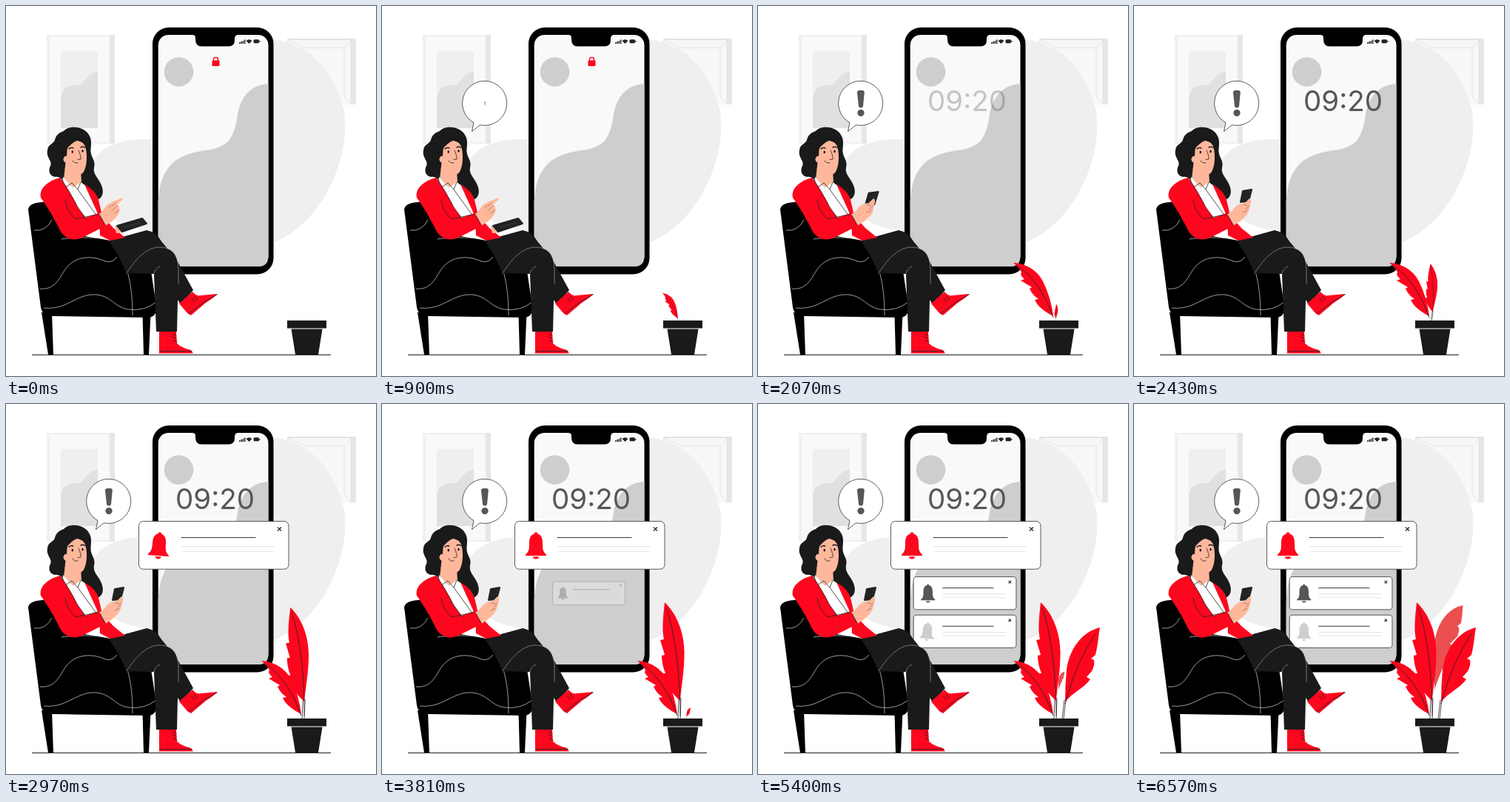
An HTML page that plays this animation: 500 px wide and 500 px high, repeating every 6.96 s.

```html
<!DOCTYPE html>
<html lang="en">
<head>
<meta charset="utf-8">
<title>Phone notifications</title>
<style>
html, body { margin: 0; width: 100%; height: 100%; overflow: hidden; background: #fff; }
svg { display: block; width: 100vw; height: 100vh; }
.red { fill: #fd071e; }
.dark { fill: #1a1a1a; }
.grey { fill: #cecece; }
.skin { fill: #ffb79b; }
.line { fill: none; stroke: #222; stroke-width: .8; stroke-linecap: round; stroke-linejoin: round; }
.brow { stroke-width: 1.5; }
.seam { fill: none; stroke: #ddd; stroke-width: .7; }
.pale { fill: none; stroke: #dedede; stroke-width: .8; }
.card * { vector-effect: non-scaling-stroke; }
</style>
</head>
<body>
<svg viewBox="0 0 500 500">
  <!-- room -->
  <g>
    <path fill="#e6e6e6" d="M139 39H147V186H139Z"/>
    <path fill="#f0f0f0" d="M55 39H141V186H55Z"/>
    <path fill="#f9f9f9" d="M59 41H139V184H59Z"/>
    <path fill="#efefef" d="M74 61H124V165H74Z"/>
    <path fill="#e0e0e0" d="M74 122C79 108 86 107 96 107C108 107 106 91 124 89V165H74Z"/>
    <path fill="#e6e6e6" d="M380 44H473V133H380Z"/>
    <path fill="#f8f8f8" d="M382 46H466V133H382Z"/>
    <path fill="#efefef" d="M350 45C400 43 444 82 457 143C467 211 420 306 350 323Z"/>
    <path fill="#f7f7f7" d="M383 47H465V57H403Z"/>
    <path class="pale" d="M382 45.500H466V133M382 45.500L404 56.500H457V122L466 133M457 56.500L466 46"/>
    <path fill="#efefef" d="M200 181C158 176 122 191 111 221C103 263 142 302 200 304Z"/>
  </g>

  <!-- big phone -->
  <rect x="198" y="29" width="163.500" height="333.500" rx="22"/>
  <rect x="205.700" y="39" width="148.800" height="313" rx="14" fill="#f9f9f9"/>
  <path class="grey" d="M354.500 105C329 106 316 126 313 147C308 181 299 191 270 195C229 201 205.700 216 205.700 274V338Q205.700 352 219 352H341Q354.500 352 354.500 338Z"/>
  <circle class="grey" cx="233.500" cy="89" r="19.800"/>
  <path d="M251 37V39C256 39 256 41 256 45Q256 54.500 264 54.500H301Q309 54.500 309 46C309 41 310 39 314 39V37Z"/>
  <g fill="#222">
    <path d="M315 49h1.500v2h-1.500zM317.300 48h1.500v3h-1.500zM319.600 47h1.500v4h-1.500zM321.900 45.500h1.500v5.500h-1.500z"/>
    <path d="M324.500 47Q328.500 43.500 332.500 47L328.500 51Z"/>
    <rect x="334.500" y="45.300" width="7.500" height="5" rx="1.500"/><path d="M342.400 46.700h1v2.200h-1z"/>
  </g>
  <g id="lock">
    <rect class="red" x="278.500" y="73.500" width="10" height="7.800" rx="1"/>
    <path d="M280.500 74V72.500a3 3 0 0 1 6 0V74" fill="none" stroke="#fd071e" stroke-width="1.400"/>
  </g>
  <text id="clock" x="282.500" y="142" text-anchor="middle" font-family="Inter, sans-serif" font-size="38.500" fill="#555759">09:20</text>

  <g id="cards"></g>

  <!-- speech bubble -->
  <g id="bubble">
    <path fill="#fff" stroke="#333" stroke-width=".8" d="M121.500 169.500L124 157.500A30 30 0 1 1 132.500 160.700Z"/>
    <g id="mark" fill="#555759">
      <path d="M134 117Q134 114 137 114H141Q144 114 143.800 117L142 135.500Q141.800 137.500 139 137.500T136 135.500Z"/>
      <circle cx="139" cy="144.500" r="4.600"/>
    </g>
  </g>

  <!-- armchair -->
  <path d="M48 414H62L64 471H57ZM184.500 416H195.500L193 471H186Z"/>
  <path d="M30 275Q31 266 49 265L70 262L100 310L142 317L170 358H196L203 404Q205 421 191 421L62 419Q49 419 47 407Z"/>
  <path class="seam" d="M38 303Q54 305 62 289M46 382C65 384 71 370 78 359C91 337 115 337 132 344Q143 349 150 339M51 408C81 411 92 392 116 390C142 389 145 407 165 410Q187 413 203 400M75 315C98 312 130 312 141 317C164 342 171 376 171 418"/>

  <!-- legs -->
  <path class="dark" d="M139 317L190 303Q203 305 210 318L230 342L253 384L236 403L205 357L163 362Q156 343 139 317Z"/>
  <path class="dark" d="M162 361C174 343 190 326 207 326C228 326 233 340 233 358L231 440H203L200 362Z"/>
  <path class="seam" opacity=".65" d="M163 361C174 344 189 326 207 326C228 326 233 340 233 358V376M200 362Q201 355 208 352"/>
  <path class="red" d="M234 402L252 386Q257 393 264 391L286 389Q281 394 270 401L250 418L245 415Z"/>
  <path class="red" d="M207 440H230L231 456Q237 462 250 465L253 469.500H207Z"/>
  <path class="line" d="M247 416L269 399L285 390M254 392l4 5M251 395l4 5M208 466.500H251M225 443l5 2M225 447l5 2M226 452l5 2"/>

  <!-- hair, neck, face -->
  <path class="dark" d="M78 169C85 161 105 162 112 174C118 184 113 191 115 200C117 207 121 210 119 218C117 227 125 233 128 240C134 252 130 262 120 262.500C112 261 111 252 104 246L84 236C76 236 72 229 66 231C58 229 57 222 60 216C63 209 54 205 56 195C57 186 64 187 66 181C68 173 73 171 78 169Z"/>
  <path class="skin" d="M81 207L78 234L91 246L102 238L101 222Z"/>
  <path class="skin" d="M83 187C88 181 101 179 107 189C110 200 110 215 105 224C98 234 86 225 82 212C76 212 76 201 82 203Z"/>
  <path class="dark" d="M79 204C80 197 83 191 87 188C92 183 96 182 99 181C105 184 108 189 110 199C115 187 106 172 93 172C79 172 73 190 75 208Z"/>
  <path class="line" d="M98 195Q102 204 101 207L97 207.500M90 209Q92 213 97 212"/>
  <path class="line brow" d="M85 193Q88 190.500 91 192M101 191Q104 189.500 107 191.500"/>
  <g id="eyes"><ellipse cx="89.800" cy="197" rx="1.200" ry="1.800"/><ellipse cx="103.500" cy="196" rx="1.200" ry="1.800"/></g>

  <!-- body -->
  <path fill="#fff" d="M77 231L90 246L101 238L112 246L126 278L131 306L117 302L77 246Z"/>
  <path class="line" d="M76 232L79 246L89 239L97 248L101 238M97 248L123 284"/>
  <path class="red" d="M106 241Q122 250 125 262L130 283L145 300L161 313L141 317L127 310L126 285Z"/>
  <g id="far">
    <path class="skin" d="M147 292L167 287Q168 295 158 300L149 301Z"/>
  </g>
  <path id="device" fill="#222" stroke="#222" stroke-width="2" stroke-linejoin="round"/>
  <path id="dots" stroke="#999" stroke-width=".8" stroke-dasharray="1 3" fill="none"/>
  <path class="skin" id="hand"/>
  <path class="line" id="fingers" opacity=".45"/>
  <path class="red" d="M73 232C60 235 44 245 47 259C58 275 65 287 71 299C77 314 89 318 101 314L135 297L125 280L107 286L97 272Q86 249 73 232Z"/>
  <path class="line" d="M74 233Q85 249 97 272L109 288M80 262Q82 277 94 288L126 281M127 283L134 296"/>

  <!-- plant -->
  <g id="plant">
    <path id="back" fill="#ea5050" d="M444.500 272C424 276 407 298 406 328L406 386C413 366 423 341 432 327L427 324L437 314C440 306 440 302 437 300L442 296Q444 284 444.500 272Z"/>
    <g id="right">
      <path class="line" d="M414 400L411 425M416 400L413 425"/>
      <path class="red" d="M462 302C440 307 421 329 417 359Q415 381 415 403C424 390 440 385 449 372L444 369L451 361C454 355 455 351 454 346L450 344L456 339C459 328 460 314 462 302Z"/>
      <path class="line" d="M456 311Q430 348 415 405"/>
    </g>
    <g id="mid">
      <path class="line" d="M401 398L400 425M404 398L403 425"/>
      <path class="red" d="M382 268C396 281 408 305 408.500 334C409 360 404 384 403 401C393 392 381 379 378 364L383 364Q378 352 378 340L382 339L376 319L381 318C378 304 380 287 382 268Z"/>
      <path class="line" d="M384 275Q403 333 403 421"/>
    </g>
    <g id="low">
      <path class="red" d="M345 347C363 348 378 358 385 372Q396 394 399 419C387 413 377 405 374 397L379 396Q371 391 367 382L370 380L355 371L360 369Q353 363 356 360Q353 353 345 347Z"/>
      <path class="line" d="M353 352Q384 376 399 421"/>
    </g>
  </g>

  <path class="dark" d="M380 425H433V435.500H380ZM385.500 436.500H427.500L422 471H391Z"/>
  <path stroke="#222" d="M35 471.500H439"/>
</svg>
<script>
const LOOP = 6960;
const $ = id => document.getElementById(id);
const clamp = v => Math.max(0, Math.min(1, v));
const span = (t, start, length) => clamp((t - start) / length);
const smooth = p => p * p * (3 - 2 * p);
const out = (p, n) => 1 - Math.pow(1 - p, n);

// Blends the numbers of two paths with the same commands.
function blend(a, b, k) {
  const nums = b.match(/-?[\d.]+/g);
  let i = 0;
  return a.replace(/-?[\d.]+/g, n => (+n + (nums[i++] - n) * k).toFixed(2));
}

function through(poses, p, knee) {
  return p < knee ? blend(poses[0], poses[1], p / knee)
                  : blend(poses[1], poses[2], (p - knee) / (1 - knee));
}

const KNEE = .453;
const DEVICE = [
  'M150 297L184 287L190 294L157 305Z',
  'M150 291L164 268L182 268L169 292Z',
  'M144 265L147 250L159 248L155 264Z'
];
const DOTS = [
  'M160 299L183 292',
  'M159 290L174 271',
  'M156 252L157 250'
];
const HAND = [
  'M125 282Q133 275 135 270Q143 264 150 262L157 259Q160 261 150 268Q156 272 152 281Q147 290 134 297Z',
  'M125 282Q133 278 136 272Q143 266 149 267L156 260Q160 262 157 270Q156 276 153 281Q147 290 134 297Z'
];
const FINGERS = [
  'M139 272L148 267M143 277L150 270M146 281L152 276',
  'M148 268L153 270M151 274L156 270M147 279L153 276'
];

const CARDS = [
  { x: 179.5, y: 158.5, size: 1, fill: '#fd071e', start: 2460 },
  { x: 210.2, y: 233.5, size: .685, fill: '#555759', start: 3690 },
  { x: 210.2, y: 285.2, size: .685, fill: '#cecece', start: 4920 }
];
$('cards').innerHTML = CARDS.map(c => `<g class="card">
  <rect width="202.5" height="64.700" rx="6" fill="#fff" stroke="#333" stroke-width=".8"/>
  <path d="M57 22H158" stroke="#222" stroke-width=".9"/>
  <path d="M57 34H182M57 41H182" stroke="#e2e2e2" stroke-width=".9"/>
  <path d="M187.500 8l5 5M192.500 8l-5 5" stroke="#222" stroke-width="1.1"/>
  <g class="bell" fill="${c.fill}">
    <circle cx="28.500" cy="17" r="2.300"/>
    <path d="M24.500 47.700H32.500Q32 51 28.500 51T24.500 47.700Z"/>
    <path d="M28.500 16.500C35 17 37.500 22 37.500 29C37.500 38 38 41 42.500 45V46.500H14.500V45C19 41 19.500 38 19.500 29C19.500 22 22 17 28.500 16.500Z"/>
  </g></g>`).join('');
const cardNodes = [...document.querySelectorAll('.card')];

function zoom(node, x, y, s, turn = 0) {
  node.style.display = s > .001 ? '' : 'none';
  node.setAttribute('transform', `translate(${x} ${y}) rotate(${turn}) scale(${s}) translate(${-x} ${-y})`);
}

function showCard(c, i, t) {
  const node = cardNodes[i], age = t - c.start;
  const k = smooth(span(age, 0, 360));
  const s = c.size * (.6 + .4 * k);
  node.style.opacity = k;
  node.setAttribute('transform',
    `translate(${c.x + 101.25 * c.size} ${c.y + 32.35 * c.size}) scale(${s}) translate(-101.25 -32.35)`);
  const q = span(age, 360, 540);
  const swing = 6 * (1 - q) * Math.sin(q * 2 * Math.PI);
  node.querySelector('.bell').setAttribute('transform', `rotate(${swing} 28.5 16)`);
}

function draw(t) {
  const pop = out(span(t, 300, 600), 2);
  zoom($('bubble'), 139, 131.5, pop);
  zoom($('mark'), 139, 131.5, smooth(span(t, 800, 450)));

  const lift = smooth(span(t, 1020, 1280));
  const grip = smooth(clamp((lift - KNEE) / (1 - KNEE)));
  $('device').setAttribute('d', through(DEVICE, lift, KNEE));
  $('dots').setAttribute('d', through(DOTS, lift, KNEE));
  $('hand').setAttribute('d', blend(HAND[0], HAND[1], grip));
  $('fingers').setAttribute('d', blend(FINGERS[0], FINGERS[1], grip));
  const drop = 6 * (1 - clamp(lift / KNEE));
  $('far').setAttribute('transform', `translate(${-12 * grip} ${drop - 14 * grip})`);
  $('eyes').setAttribute('transform', `translate(0 ${.6 * lift})`);

  $('lock').style.opacity = 1 - span(t, 1740, 300);
  $('clock').style.opacity = smooth(span(t, 1900, 450));
  CARDS.forEach((c, i) => showCard(c, i, t));

  const low = smooth(span(t, 300, 1290));
  zoom($('low'), 400, 425, low, 10 * (1 - low));
  const mid = smooth(span(t, 1740, 1410));
  zoom($('mid'), 402, 425, mid, 12 * (1 - mid));
  zoom($('right'), 411, 425, out(span(t, 3690, 1410), 1.4));
  zoom($('back'), 406, 386, out(span(t, 5130, 1440), 1.15));
}

const begin = performance.now();
function tick() {
  draw((performance.now() - begin) % LOOP);
  requestAnimationFrame(tick);
}
tick();
</script>
</body>
</html>
```
